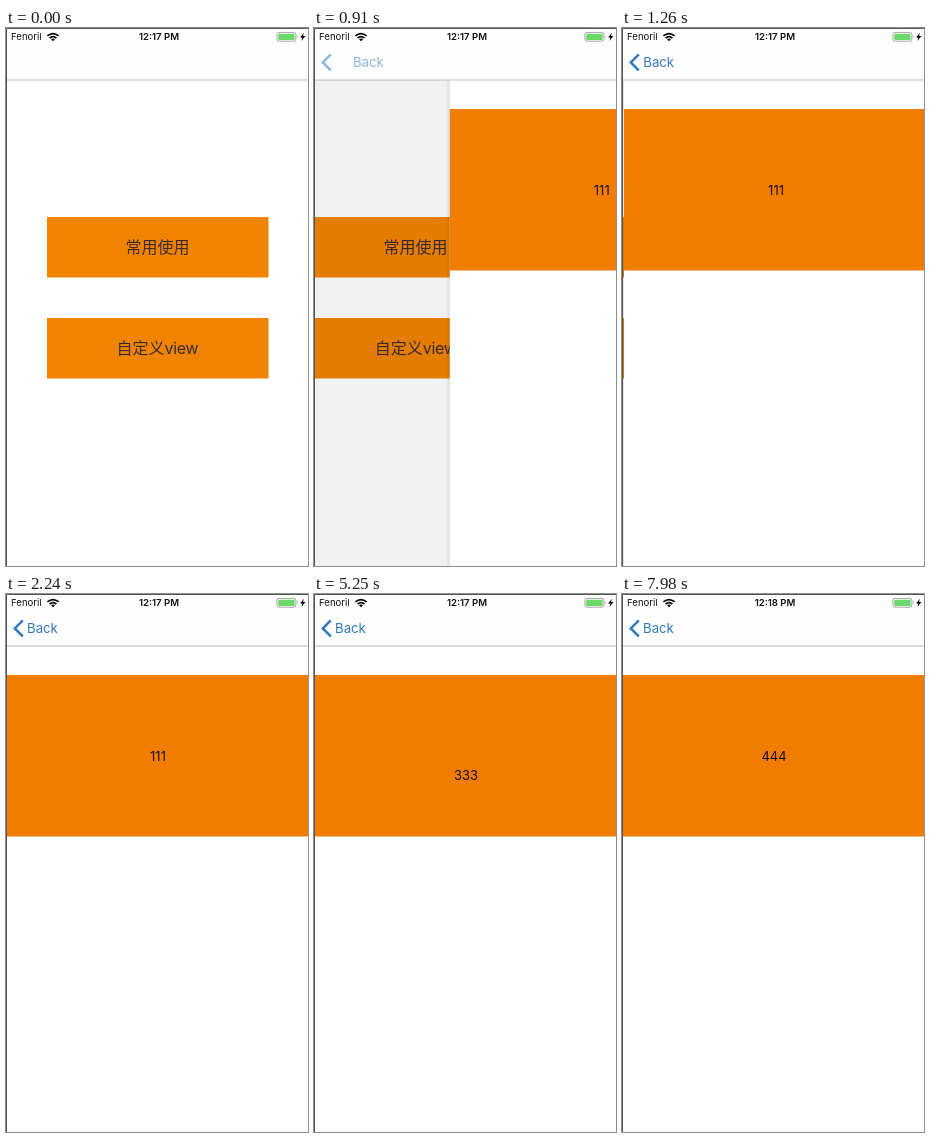
An HTML page for the animation above (8 s loop, 302x538 px).

```html
<!DOCTYPE html>
<html lang="zh">
<head>
<meta charset="utf-8">
<title>Vertical label scroller</title>
<style>
  html, body { margin: 0; width: 100%; height: 100%; overflow: hidden; background: #fff; }
  svg { display: block; width: 100vw; height: 100vh; }
  text { font-family: Inter, "Noto Sans CJK SC", "Noto Sans CJK", sans-serif; }
  .status { font-size: 9.6px; fill: #111; }
  .button { font-size: 16px; fill: #3c2b2b; text-anchor: middle; }
  .label { font-size: 13px; fill: #1d0d18; text-anchor: middle; }
  .back { font-size: 13.2px; fill: #3079bd; }
</style>
</head>
<body>
<svg viewBox="0 0 302 538">
  <defs>
    <linearGradient id="shade">
      <stop offset="0" stop-color="#000" stop-opacity="0"/>
      <stop offset="1" stop-color="#000" stop-opacity=".2"/>
    </linearGradient>
    <clipPath id="window"><rect y="81" width="302" height="161"/></clipPath>
  </defs>

  <rect width="302" height="538" fill="#fff"/>

  <g id="menu">
    <rect x="41" y="189" width="221.5" height="60.5" fill="#f08300"/>
    <text class="button" x="151.5" y="225">常用使用</text>
    <rect x="41" y="290" width="221.5" height="60.5" fill="#f08300"/>
    <text class="button" x="151.5" y="326">自定义<tspan letter-spacing="-.3">view</tspan></text>
  </g>
  <rect id="dim" width="302" height="538"/>

  <g id="page">
    <rect id="edge" x="-4" width="4" height="538" fill="url(#shade)"/>
    <rect width="302" height="538" fill="#fff"/>
    <rect y="81" width="302" height="161.5" fill="#f07d00"/>
    <g clip-path="url(#window)">
      <text class="label" id="current" x="152"></text>
      <text class="label" id="next" x="152"></text>
    </g>
  </g>

  <rect width="302" height="52" fill="#fefefe"/>
  <rect y="51.5" width="302" height="1" fill="#bcbcbc"/>
  <path id="chevron" d="M16.8 26.4L8.8 34.4L16.8 42.4" fill="none" stroke="#3079bd" stroke-width="2.5"/>
  <text class="back" id="back" y="39.2">Back</text>

  <text class="status" x="5" y="12.4">Fenoril</text>
  <g fill="none" stroke="#000" stroke-width="1.7">
    <path d="M41.4 7.9Q47 3.2 52.6 7.9"/>
    <path d="M43.6 10.1Q47 7.3 50.4 10.1"/>
  </g>
  <path d="M45 11.3Q47 9.8 49 11.3L47 13.3Z"/>
  <text class="status" id="clock" x="153" y="12.4" text-anchor="middle" font-weight="600"></text>
  <rect x="270.9" y="4.4" width="19" height="8.8" rx="2.2" fill="#fff" stroke="#8c8c8c" stroke-width=".8"/>
  <rect x="272.2" y="5.7" width="16.4" height="6.2" rx="1" fill="#6bd968"/>
  <path d="M291 7.2q1.3 1.6 0 3.2z" fill="#8c8c8c"/>
  <path d="M298 4.8L294 9.6H296.4L295.4 13L299.4 8H297Z"/>

  <path d="M.5 538V.5H302" fill="none" stroke="#555" stroke-width="1"/>
</svg>
<script>
  const LOOP = 8000, WIDTH = 302, ROW = 161, BASE = 166.6;
  const PUSH_START = 787, PUSH_RATE = 0.015;
  const SCROLL_STARTS = [2742, 4896, 7081], SCROLL_TIME = 465;
  const $ = id => document.getElementById(id);
  const clamp = x => Math.min(1, Math.max(0, x));

  // Critically damped spring from 0 to 1
  function spring(ms) {
    const a = Math.max(0, ms) * PUSH_RATE;
    return 1 - (1 + a) * Math.exp(-a);
  }

  // cubic-bezier(.42, 0, .58, 1), solved by bisection
  function ease(x) {
    if (x <= 0 || x >= 1) return clamp(x);
    let lo = 0, hi = 1, s = 0.5;
    for (let i = 0; i < 24; i++) {
      s = (lo + hi) / 2;
      const bx = 1.26 * s * (1 - s) ** 2 + 1.74 * s * s * (1 - s) + s ** 3;
      if (bx < x) lo = s; else hi = s;
    }
    return s * s * (3 - 2 * s);
  }

  const slide = (id, x) => $(id).setAttribute("transform", `translate(${x} 0)`);
  const setText = (id, value) => {
    if ($(id).textContent !== value) $(id).textContent = value;
  };

  function drawPush(t) {
    let p = spring(t - PUSH_START);
    if (p > 0.9985) p = 1;
    slide("menu", -0.3 * WIDTH * p);
    slide("page", WIDTH * (1 - p));
    $("dim").setAttribute("opacity", 0.1 * p);
    $("edge").setAttribute("opacity", p > 0 ? 1 - p : 0);
    $("back").setAttribute("x", 21 + 40 * (1 - p));
    $("back").setAttribute("opacity", p);
    $("chevron").setAttribute("opacity", p);
  }

  function drawLabels(t) {
    const scroll = SCROLL_STARTS.reduce((sum, start) => sum + ease((t - start) / SCROLL_TIME), 0);
    const index = Math.floor(scroll), offset = (scroll - index) * ROW;
    setText("current", String(index + 1).repeat(3));
    setText("next", String(index + 2).repeat(3));
    $("current").setAttribute("y", BASE - offset);
    $("next").setAttribute("y", BASE - offset + ROW);
  }

  function draw(t) {
    drawPush(t);
    drawLabels(t);
    setText("clock", t < 7700 ? "12:17 PM" : "12:18 PM");
  }

  let begin = null;
  function tick(now) {
    if (begin === null) begin = now;
    draw((now - begin) % LOOP);
    requestAnimationFrame(tick);
  }
  draw(0);
  requestAnimationFrame(tick);
</script>
</body>
</html>
```
